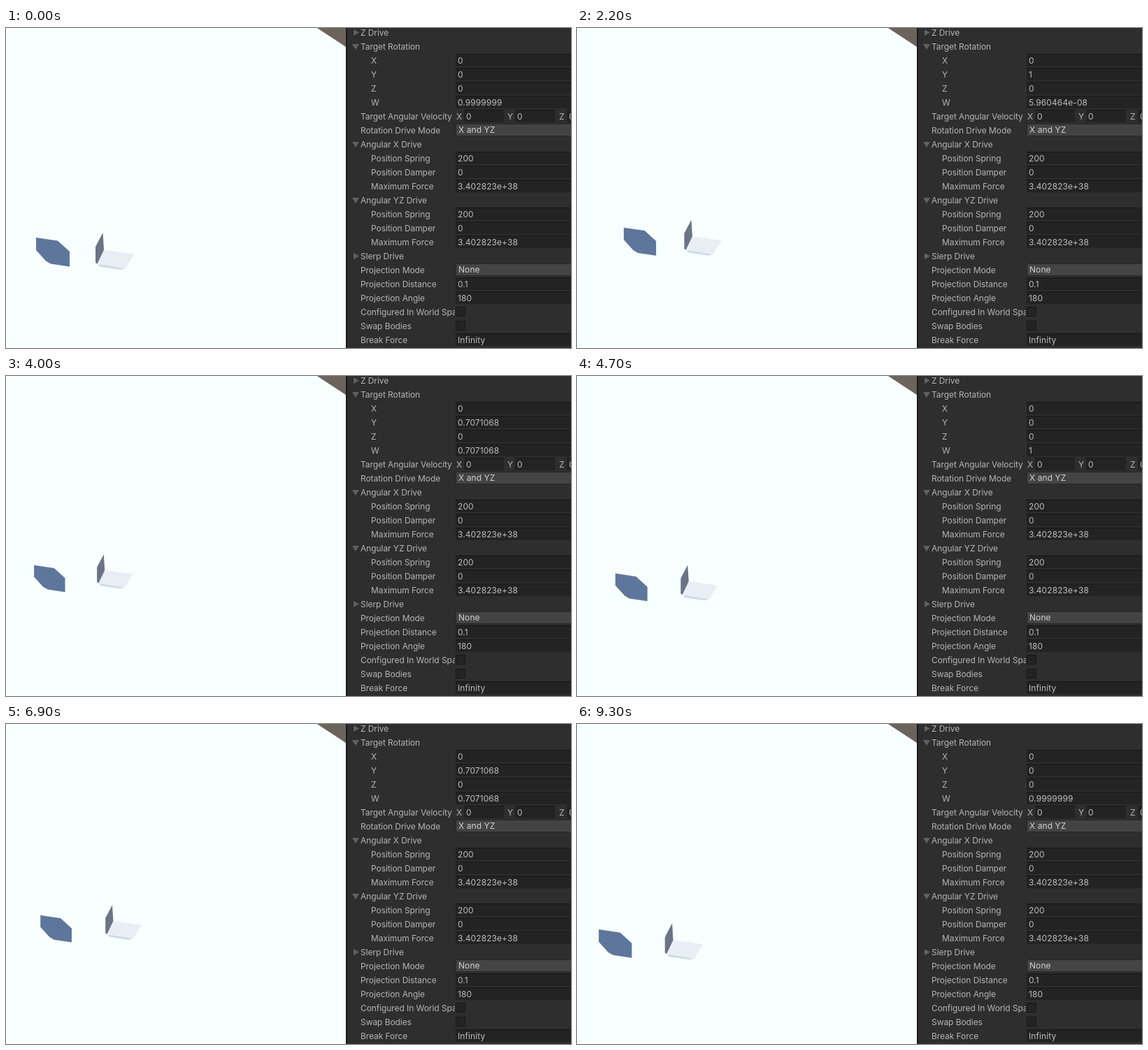
Recreate the animation shown at these times as an HTML page with a canvas. Size 808x458 px, loop 9400 ms.

```html
<!DOCTYPE html>
<html>
<head>
<meta charset="utf-8">
<style>
html, body { margin: 0; width: 808px; height: 458px; overflow: hidden; background: #f8ffff; }
canvas { display: block; }
</style>
</head>
<body>
<canvas id="stage" width="808" height="458"></canvas>
<script>
const ctx = document.getElementById('stage').getContext('2d');
const LOOP = 9400, STEP = 100, TURN = 900;

// Turning points of the undamped swing, as [time, value].
const swingX = [[0, 43], [800, 43], [2150, 67], [3550, 34.5], [4850, 55.5],
  [6125, 30.5], [7250, 54.5], [8700, 30], [10000, 32.5]];
const swingY = [[0, 345], [1100, 345.5], [3400, 304], [3650, 304], [5750, 340],
  [7200, 307], [7650, 307], [9700, 340]];
const spread = [[0, 95.5], [1500, 99.5], [3000, 93], [4700, 103.5], [8000, 102.5], [9400, 105]];

// Target angle after each turn, and the quaternion Y and W it shows.
const angles = [360, 90, 180, 270, 90, 0, 180, 90, 270, 0, 360];
const quaternion = {
  0: ['0', '1'],
  90: ['0.7071068', '0.7071068'],
  180: ['1', '5.960464e-08'],
  270: ['0.7071068', '-0.7071068'],
  360: ['0', '0.9999999']
};

const blue = [0, 0, 31, 4.5, 48, 20, 48, 41.5, 21, 37.5, 14, 33.5, 0, 18];
const edge = [-7, 44, 32, 51, 26, 53, -5, 48.5];
const floorPlate = [1, 24.5, 45, 30.5, 32, 51.5, -8, 45];
const wallPlate = [0, 0, -10.5, 20, -10.5, 43, -8, 44.5, 1.5, 24.5];

const rows = [
  ['Z Drive', 'closed'],
  ['Target Rotation', 'open'],
  ['X', 'sub', '0'],
  ['Y', 'sub', 'y'],
  ['Z', 'sub', '0'],
  ['W', 'sub', 'w'],
  ['Target Angular Velocity', 'vector'],
  ['Rotation Drive Mode', 'menu', 'X and YZ'],
  ...drive('Angular X Drive'),
  ...drive('Angular YZ Drive'),
  ['Slerp Drive', 'closed'],
  ['Projection Mode', 'menu', 'None'],
  ['Projection Distance', 'field', '0.1'],
  ['Projection Angle', 'field', '180'],
  ['Configured In World Space', 'check'],
  ['Swap Bodies', 'check'],
  ['Break Force', 'field', 'Infinity']
];

function drive(name) {
  return [[name, 'open'], ['Position Spring', 'sub', '200'],
    ['Position Damper', 'sub', '0'], ['Maximum Force', 'sub', '3.402823e+38']];
}

function swing(keys, t) {
  const i = keys.findIndex(k => k[0] > t);
  const [t0, a] = keys[i - 1], [t1, b] = keys[i];
  return a + (b - a) * (1 - Math.cos(Math.PI * (t - t0) / (t1 - t0))) / 2;
}

function rect(x, y, w, h, color) {
  ctx.fillStyle = color;
  ctx.fillRect(x, y, w, h);
}

function poly(points, color, x = 0, y = 0, scale = 1) {
  ctx.fillStyle = color;
  ctx.beginPath();
  for (let i = 0; i < points.length; i += 2) {
    ctx.lineTo(x + points[i] * scale, y + points[i + 1] * scale);
  }
  ctx.fill();
}

function label(s, x, y) {
  ctx.letterSpacing = '-0.07px';
  ctx.fillStyle = '#b4b4b4';
  ctx.fillText(s, x, y + 4);
}

function value(s, x, y, color = '#bebebe') {
  ctx.letterSpacing = '0.08px';
  ctx.fillStyle = color;
  ctx.fillText(s, x, y + 4);
}

function field(x, y, w, s) {
  rect(x, y - 10, w, 18, '#232323');
  rect(x, y - 10, w, 1, '#151515');
  value(s, x + 3, y);
}

const controls = {
  closed: y => poly([497, y - 5, 505, y - 0.5, 497, y + 4], '#606060'),
  open: y => poly([495, y - 4, 505, y - 4, 500, y + 4], '#606060'),
  field: (y, s) => field(643, y, 170, s),
  sub: (y, s) => field(643, y, 170, s),
  menu(y, s) {
    rect(643, y - 10, 165, 18, '#262626');
    rect(644, y - 9, 164, 16, '#444444');
    value(s, 647, y - 1, '#d0d0d0');
  },
  check(y) {
    rect(643, y - 8, 14, 14, '#181818');
    rect(644, y - 7, 12, 12, '#232323');
  },
  vector(y) {
    [['X', 644, 655], ['Y', 717, 728], ['Z', 791, 802]].forEach(([axis, nameX, fieldX]) => {
      label(axis, nameX, y);
      field(fieldX, y, 57, '0');
    });
  }
};

function drawObjects(t) {
  const x = swing(swingX, t), near = (swing(swingY, t) - 304) / 41;
  const scale = 0.92 + 0.08 * near;
  const plateX = x + swing(spread, t), plateY = 253 + 40 * near;
  poly(blue, '#5f769c', x, 269 + 31 * near, scale);
  poly(edge, '#ccd9e2', plateX, plateY, scale);
  poly(floorPlate, '#e8eef4', plateX, plateY, scale);
  poly(wallPlate, '#6b7387', plateX, plateY, scale);
}

function drawPanel(t) {
  const [y, w] = quaternion[angles[Math.floor((t + 100) / TURN)]];
  const live = { y, w };
  rect(486, 0, 322, 458, '#2e2e2e');
  rect(486, 0, 2, 458, '#191919');
  rows.forEach(([name, kind, s], i) => {
    const rowY = 7 + 20 * i;
    ctx.save();
    ctx.beginPath();
    ctx.rect(488, rowY - 10, 154, 20);
    ctx.clip();
    label(name, kind === 'sub' ? 522 : 507, rowY);
    ctx.restore();
    controls[kind](rowY, live[s] || s);
  });
}

function draw(now) {
  const t = Math.floor(now % LOOP / STEP) * STEP;
  rect(0, 0, 808, 458, '#f8ffff');
  poly([445, 0, 486, 27, 486, 0], '#6b635c');
  drawObjects(t);
  ctx.font = '12px Inter, sans-serif';
  drawPanel(t);
}

const start = performance.now();
function tick() {
  draw(performance.now() - start);
  requestAnimationFrame(tick);
}
tick();
</script>
</body>
</html>
```
